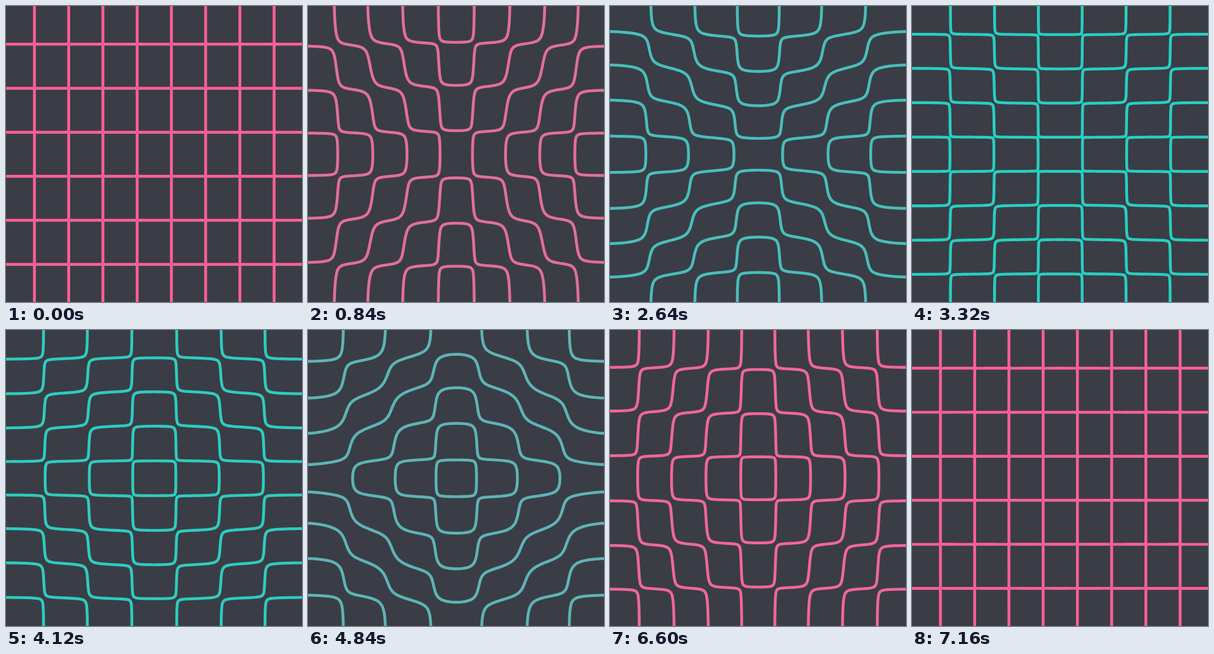
An HTML page that plays this animation: 540x540 px, repeating every 7.2 s.

```html
<!DOCTYPE html>
<html lang="en">
<head>
<meta charset="utf-8">
<title>Nodal lines</title>
<style>
  html, body { margin: 0; width: 100%; height: 100%; overflow: hidden; background: #3a3d46; }
  svg { display: block; width: 100vw; height: 100vh; }
</style>
</head>
<body>
<svg viewBox="0 0 540 540">
  <rect width="540" height="540" fill="#3a3d46"/>
  <path id="lines" fill="none" stroke-width="5.2" stroke-linecap="round"/>
</svg>
<script>
const LOOP = 7200, STEP = 40;
const CENTER = 270.5, PLATE = 562.2;
const CELL = 3, COUNT = 183;
const PINK = [255, 95, 148], TEAL = [36, 209, 193];
const lines = document.getElementById('lines');

const position = i => (i - 1) * CELL;
const wave = n => Array.from({ length: COUNT }, (_, i) =>
  Math.cos(Math.PI * n * (position(i) - CENTER) / PLATE));
const fine = wave(9), coarse = wave(7);
const field = new Float64Array(COUNT * COUNT);

// Zero line of a standing wave mixed from two crossed modes.
function nodalPath(angle) {
  const a = Math.cos(angle), b = Math.sin(angle);
  for (let j = 0; j < COUNT; j++)
    for (let i = 0; i < COUNT; i++)
      field[j * COUNT + i] = a * fine[i] * coarse[j] - b * coarse[i] * fine[j];

  const parts = [];
  const segment = (p, q) => parts.push(
    `M${p[0].toFixed(2)} ${p[1].toFixed(2)}L${q[0].toFixed(2)} ${q[1].toFixed(2)}`);

  for (let j = 0; j < COUNT - 1; j++) {
    for (let i = 0; i < COUNT - 1; i++) {
      const k = j * COUNT + i;
      const tl = field[k], tr = field[k + 1];
      const bl = field[k + COUNT], br = field[k + COUNT + 1];
      const s = tl > 0;
      if (s === tr > 0 && s === bl > 0 && s === br > 0) continue;

      const x = position(i), y = position(j), hits = [];
      const cut = (u, v) => CELL * u / (u - v);
      if (s !== tr > 0) hits.push([x + cut(tl, tr), y]);
      if (tr > 0 !== br > 0) hits.push([x + CELL, y + cut(tr, br)]);
      if (bl > 0 !== br > 0) hits.push([x + cut(bl, br), y + CELL]);
      if (s !== bl > 0) hits.push([x, y + cut(tl, bl)]);

      if (hits.length === 2) {
        segment(hits[0], hits[1]);
      } else {
        // Saddle: the sign at the saddle point decides which corners join.
        const joined = (tl * br - tr * bl) / (tl + br - tr - bl) > 0 === s;
        segment(hits[0], hits[joined ? 1 : 3]);
        segment(hits[2], hits[joined ? 3 : 1]);
      }
    }
  }
  return parts.join('');
}

const ease = x => (1 - Math.cos(Math.PI * x)) / 2;

function draw(time) {
  const phase = 2 * time / LOOP;
  const half = Math.floor(phase);
  const eased = ease(phase - half);
  const mix = half ? 1 - eased : eased;
  const color = PINK.map((c, i) => Math.round(c + (TEAL[i] - c) * mix));
  lines.setAttribute('d', nodalPath((half + eased) * Math.PI / 2));
  lines.setAttribute('stroke', `rgb(${color})`);
}

const start = performance.now();
let shown = -1;
function tick() {
  const elapsed = (performance.now() - start) % LOOP;
  const time = Math.floor(elapsed / STEP) * STEP;
  if (time !== shown) draw(shown = time);
  requestAnimationFrame(tick);
}
tick();
</script>
</body>
</html>
```
